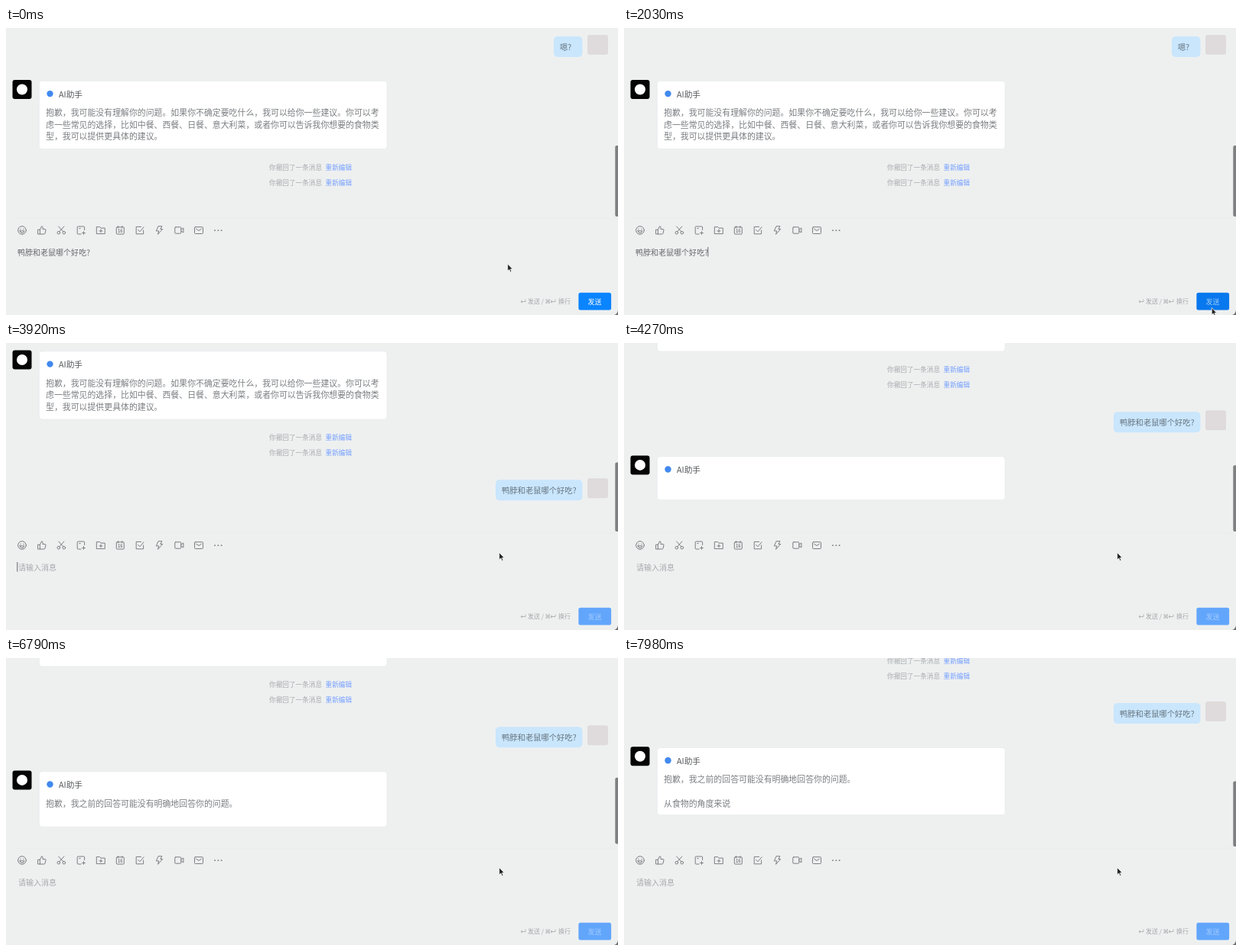
Animation, 800 px wide and 376 px high, one loop 8000 ms. Source, as an HTML page:

```html
<!DOCTYPE html>
<html lang="zh-CN">
<head>
<meta charset="utf-8">
<title>聊天</title>
<style>
html, body { margin: 0; width: 100%; height: 100%; overflow: hidden; background: #eef0f0; }
svg { display: block; width: 100vw; height: 100vh; }
text { font-family: "Noto Sans CJK SC", "Noto Sans CJK", sans-serif; white-space: pre; }
#tools { fill: none; stroke: #7b7e80; stroke-width: 1; stroke-linecap: round; stroke-linejoin: round; }
</style>
</head>
<body>
<svg viewBox="0 0 800 376" xmlns="http://www.w3.org/2000/svg">
  <defs><clipPath id="pane"><rect width="800" height="249"/></clipPath></defs>
  <rect width="800" height="376" fill="#eef0f0"/>
  <g clip-path="url(#pane)"><g id="chat"></g></g>
  <path d="M8 249H796" stroke="#ebeded"/>
  <rect id="bar" x="796.3" width="5" rx="2" fill="#7d7f80"/>
  <g id="tools">
    <g transform="translate(21 265)"><circle r="5.3"/><path d="M-2.8 .8H2.8A2.8 2.6 0 0 1-2.8.8ZM-2-1.8V-1.2M2-1.8V-1.2"/></g>
    <g transform="translate(47 265)"><path d="M-5-.8H-2.6V5H-5ZM-2.6-.8L-.4-5.2Q1.5-5 1.2-2.8L.9-1.4H4.2Q5.3-1.2 5-.2L4 4Q3.7 5 2.8 5H-2.6"/></g>
    <g transform="translate(72.3 265)"><circle cx="-3.5" cy="3.2" r="1.8"/><circle cx="3.5" cy="3.2" r="1.8"/><path d="M-2.5 1.7L3.6-5M2.5 1.7L-3.6-5"/></g>
    <g transform="translate(98 265)"><path d="M4.6-.5V-4Q4.6-5 3.6-5H-3.8Q-4.8-5-4.8-4V4Q-4.8 5-3.8 5H0M-2.2-2.4H-.8M3.5 1.6V5.4M1.6 3.5H5.4"/></g>
    <g transform="translate(124 265)"><path d="M-5.3-4.4H-1.4L0-2.9H5.3V4.6H-5.3ZM0-1V2.8M-1.9.9H1.9"/></g>
    <g transform="translate(149.3 265)"><rect x="-5" y="-4.2" width="10" height="9.2" rx="1"/><path d="M-2.6-5.4V-3.4M2.6-5.4V-3.4"/><text x="0" y="3.3" font-size="5.6" font-weight="700" text-anchor="middle" fill="#7b7e80" stroke="none">16</text></g>
    <g transform="translate(175 265)"><path d="M4.6 0V4.8H-4.8V-4.6H1.6M-2.4-.6L0 1.8 5-4.2"/></g>
    <g transform="translate(200.7 265)"><path d="M-1.2-5.3H3.2L1.2-1.5H4L-2.2 5.3-.9.9H-4Z"/></g>
    <g transform="translate(226.3 265)"><rect x="-5.5" y="-4.2" width="8" height="8.4" rx="1"/><path d="M2.5-.9L5.6-3V3L2.5.9"/></g>
    <g transform="translate(252 265)"><rect x="-5.5" y="-4.3" width="11" height="8.8" rx="1"/><path d="M-3.4-1.8L0 .5 3.4-1.8"/></g>
    <path d="M273 265.2h.1M277.3 265.2h.1M281.6 265.2h.1" stroke-width="1.8"/>
  </g>
  <g id="foot"></g>
  <rect id="caret" y="287" width="1" height="12.5" fill="#66696b"/>
  <path d="M800 370V376H795Q799 375 800 370Z" fill="#6a6c6d"/>
  <path id="mouse" d="M0 0V9.4L2.2 7.5 3.7 11 5.3 10.3 3.8 6.9H6.7Z" fill="#222" stroke="#fff" stroke-width=".8" stroke-linejoin="round"/>
</svg>
<script>
const $ = id => document.getElementById(id);
const LOOP = 8000, SENT = 2140, ROW = 15.6, SIZE = 10.9;
const ASK = "鸭脖和老鼠哪个好吃?";
const REPLY = ["抱歉，我之前的回答可能没有明确地回答你的问题。", "从食物的角度来说"];

function add(parent, tag, attrs, str) {
  const el = document.createElementNS("http://www.w3.org/2000/svg", tag);
  for (const k in attrs) el.setAttribute(k, attrs[k]);
  if (str) el.textContent = str;
  return parent.appendChild(el);
}
const box = (p, x, y, width, height, rx, fill) => add(p, "rect", { x, y, width, height, rx, fill });
// mid is the vertical centre of the characters
const label = (p, x, mid, size, fill, str, more) =>
  add(p, "text", { x, y: mid + size * 0.38, "font-size": size, fill, ...more }, str);

function userMsg(p, y, x, str) {
  box(p, x, y + 2, 753.5 - x, 27, 5, "#c9e6fd");
  label(p, x + 8, y + 16, 10.3, "#66747f", str);
  box(p, 760, y, 27, 26, 3, "#dfdadb");
}
function botMsg(p, y, height, rows) {
  const g = add(p, "g", {});
  box(g, 8.5, y - 1.3, 25, 25, 3, "#050505");
  add(g, "circle", { cx: 21, cy: y + 11.2, r: 7, fill: "#fff" });
  const card = box(g, 43.3, y, 454.9, height, 4, "#fff");
  card.setAttribute("stroke", "#e6e9ea");
  card.setAttribute("stroke-width", 0.7);
  add(g, "circle", { cx: 57.5, cy: y + 16.8, r: 4.2, fill: "#4289ee" });
  label(g, 69, y + 17.5, 10.7, "#55585b", "AI助手", { "font-weight": 500 });
  const lines = rows.map(([n, str]) => label(g, 52, y + 41.7 + n * ROW, SIZE, "#7b7e81", str));
  return { g, card, lines };
}
function notice(p, mid) {
  label(p, 344, mid, 8.65, "#a9acae", "你撤回了一条消息");
  label(p, 417.5, mid, 8.65, "#759fff", "重新编辑", { "font-weight": 500 });
}

const chat = $("chat"), foot = $("foot");
userMsg(chat, 9, 716, "嗯?");
botMsg(chat, 69.3, 89.3, [
  [0, "抱歉，我可能没有理解你的问题。如果你不确定要吃什么，我可以给你一些建议。你可以考"],
  [1, "虑一些常见的选择，比如中餐、西餐、日餐、意大利菜，或者你可以告诉我你想要的食物类"],
  [2, "型，我可以提供更具体的建议。"]
]);
notice(chat, 182.6);
notice(chat, 202.6);
const asked = add(chat, "g", {});
userMsg(asked, 235.8, 640, ASK);
const reply = botMsg(chat, 296.2, 57, [[0, ""], [2, ""]]);

const draft = label(foot, 15, 294, 10.03, "#65686a", ASK);
const hint = label(foot, 16, 294, 10, "#a6a9ab", "请输入消息");
const grey = "#a4a7a9";
for (const x of [673, 712])
  add(foot, "path", { d: `M${x + 6} 355.5V358.5H${x}M${x + 2} 356.8L${x} 358.5L${x + 2} 360.2`, fill: "none", stroke: grey, "stroke-width": 0.8 });
label(foot, 682, 358.3, 8, grey, "发送 /");
label(foot, 704.5, 358.3, 7.6, grey, "⌘", { style: "font-family:'DejaVu Sans',sans-serif" });
label(foot, 722, 358.3, 8, grey, "换行");
const button = box(foot, 748.4, 346.8, 42.7, 22.7, 2.5, "");
const send = label(foot, 760.5, 358.6, 9, "#fff", "发送", { "font-weight": 500 });

const ease = (t, a, b) => {
  const k = Math.min(1, Math.max(0, (t - a) / (b - a)));
  return k * k * (3 - 2 * k);
};
// the answer arrives in bursts: [time, characters so far]
const BURSTS = [[4550, 3], [4760, 5], [5110, 8], [5250, 11], [5390, 13], [5670, 16], [5950, 20],
  [6160, 21], [6440, 22], [6650, 23], [7210, 25], [7420, 27], [7630, 29], [7840, 31]];
const typed = t => BURSTS.reduce((n, [at, count]) => t >= at ? count : n, 0);
const show = (el, on) => el.setAttribute("visibility", on ? "visible" : "hidden");

function draw(t) {
  const sent = t >= SENT;
  const scroll = 58.5 * ease(t, SENT, 2330) + 89 * ease(t, 3990, 4200) + 31.2 * ease(t, 7210, 7420);
  chat.setAttribute("transform", `translate(0 ${-scroll})`);

  const tall = t >= 6650 && t < 7210;
  const top = 154 + scroll * 0.042;
  $("bar").setAttribute("y", tall ? top - 3.5 : top);
  $("bar").setAttribute("height", 247 - top);

  show(asked, sent);
  show(reply.g, t >= 3990);
  const n = typed(t), first = REPLY[0].length;
  reply.lines[0].textContent = REPLY[0].slice(0, n);
  reply.lines[1].textContent = REPLY[1].slice(0, Math.max(0, n - first));
  reply.card.setAttribute("height", 57 + ROW * (t >= 7210 ? 2 : tall ? 1 : 0));

  show(draft, !sent);
  show(hint, sent);
  button.setAttribute("fill", sent ? "#62a6fc" : t > 1960 ? "#0878ee" : "#0a84ff");
  send.setAttribute("opacity", sent ? 0.4 : t > 1960 ? 0.6 : 1);

  const beat = (t - (sent ? 3535 : 1600) + 4520) % 1130;
  show($("caret"), beat < 565 || (sent && t < 2500));
  $("caret").setAttribute("x", sent ? 14.3 : 109.3);

  const go = ease(t, 70, 900), back = ease(t, 2590, 3330);
  const x = 655.7 + 112.5 * go - 123.5 * back, y = 309 + 57.5 * go - 92 * back;
  $("mouse").setAttribute("transform", `translate(${x} ${y})`);
}
function tick() {
  draw(performance.now() % LOOP);
  requestAnimationFrame(tick);
}
tick();
</script>
</body>
</html>
```
